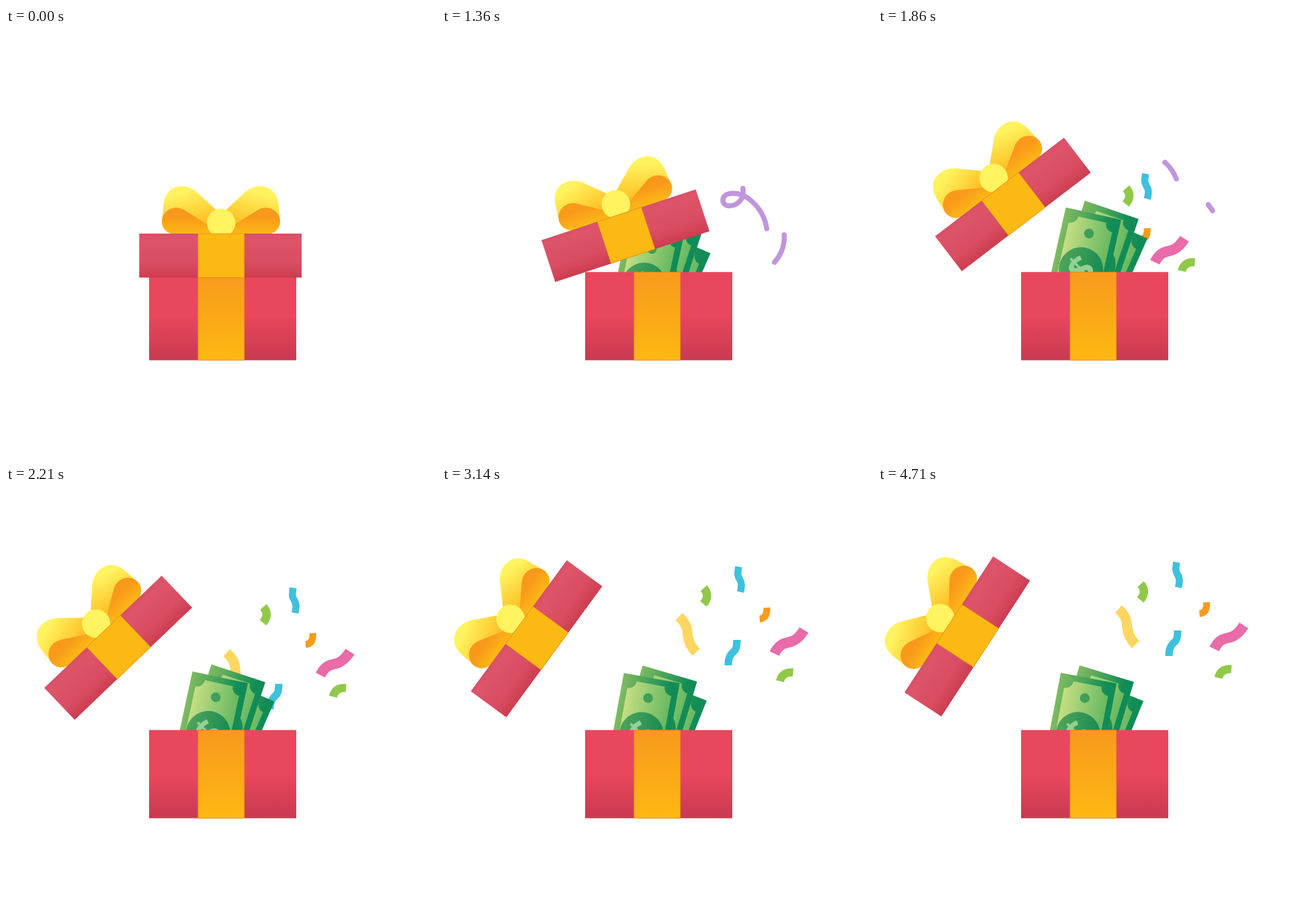
An HTML page that plays this animation: 640x640 px, repeating every 5370 ms.

```html
<!DOCTYPE html>
<html lang="en">
<head>
<meta charset="utf-8">
<title>Gift box</title>
<style>
html, body { margin: 0; width: 100%; height: 100%; overflow: hidden; background: #fff; }
svg { display: block; width: 100vw; height: 100vh; }
#confetti path, #streamers path { fill: none; }
#streamers path { stroke: #c095dd; stroke-width: 7.5; stroke-linecap: round; }
text { font: 700 56px "Open Sans", sans-serif; text-anchor: middle; }
.strip { stroke: #d98a1c; stroke-width: .6; }
</style>
</head>
<body>
<svg viewBox="0 0 640 640">
  <defs>
    <linearGradient id="body" x2="0" y2="1">
      <stop offset=".5" stop-color="#e8475d"/><stop offset="1" stop-color="#c93a50"/>
    </linearGradient>
    <linearGradient id="lidRed" x2="0" y2="1">
      <stop stop-color="#d84f66"/><stop offset=".1" stop-color="#dd5469"/>
      <stop offset=".65" stop-color="#da4d62"/><stop offset="1" stop-color="#cd3d50"/>
    </linearGradient>
    <linearGradient id="ribbon" x2="0" y2="1">
      <stop stop-color="#f8991c"/><stop offset="1" stop-color="#fdb813"/>
    </linearGradient>
    <linearGradient id="loop" x1=".3" x2=".65" y2="1">
      <stop offset=".15" stop-color="#fff35f"/><stop offset="1" stop-color="#fcb81c"/>
    </linearGradient>
    <linearGradient id="fold" x2="0" y2="1">
      <stop offset=".35" stop-color="#f9991b"/><stop offset="1" stop-color="#fdb915"/>
    </linearGradient>
    <linearGradient id="edge"><stop stop-color="#7fbb60"/><stop offset=".85" stop-color="#118c56"/></linearGradient>
    <linearGradient id="panel"><stop stop-color="#c6de82"/><stop offset="1" stop-color="#67b962"/></linearGradient>
    <linearGradient id="seal"><stop stop-color="#4fa45a"/><stop offset="1" stop-color="#168a54"/></linearGradient>
    <g id="bill">
      <path d="M0 0H84.5V105H0Z" fill="url(#edge)"/>
      <path d="M21 9H63.5A12 12 0 0 0 75.5 21V105H9V21A12 12 0 0 0 21 9Z" fill="url(#panel)"/>
      <circle cx="42.2" cy="30.3" r="7.2" fill="#3f9f58"/>
      <circle cx="42.2" cy="85" r="33" fill="url(#seal)"/>
      <text transform="translate(42.2 85) rotate(-57)" y="20" fill="#93d193">$</text>
    </g>
    <g id="bow">
      <path d="M316 274L287 247C270 229 238 231 234.5 262L232 290L302 300Z" fill="url(#loop)"/>
      <path d="M304 295L267 272C251 261 232 272 232 288C232 299 241 307 251 307H312Z" fill="url(#fold)"/>
    </g>
  </defs>
  <g id="streamers">
    <path pathLength="1" d="M467.5 343.5C481 329 486 315 483.5 300C481 281 473 268 460 257C444 242 419 243 418 256C418 268 437 268 446 254C453 239 442 213 427 200"/>
    <path pathLength="1" d="M492 352C503 340 508 330 509 318C511 299 504 278 491.500 263"/>
  </g>
  <g id="confetti"></g>
  <g id="bills">
    <use href="#bill" transform="translate(316.7 288.3) rotate(22)"/>
    <use href="#bill" transform="translate(300 267) rotate(16.8)"/>
    <use href="#bill" transform="translate(272 278) rotate(10.7)"/>
  </g>
  <path d="M213 363.200H432V494.500H213Z" fill="url(#body)"/>
  <path class="strip" d="M285.800 363.200H354.800V494.500H285.800Z" fill="url(#ribbon)"/>
  <g id="lid">
    <g transform="translate(-319 -371.5)">
      <use href="#bow"/>
      <use href="#bow" transform="matrix(-1 0 0 1 640 0)"/>
      <circle cx="320.2" cy="290" r="21.2" fill="#fff35f"/>
      <path d="M198.300 306H440V371.500H198.300Z" fill="url(#lidRed)"/>
      <path class="strip" d="M285.800 306H354.800V371.500H285.800Z" fill="#fcb813"/>
    </g>
  </g>
</svg>
<script>
const LOOP = 5370, HOLD = 500, FPS = 14;
const $ = id => document.getElementById(id);

// Monotone cubic through the points (times[i], values[i]); flat at both ends.
function curve(times, values) {
  const slope = i => (values[i + 1] - values[i]) / (times[i + 1] - times[i]);
  const tangent = i => {
    if (i === 0 || i === times.length - 1) return 0;
    const a = slope(i - 1), b = slope(i);
    return a * b > 0 ? 2 * a * b / (a + b) : 0;
  };
  return t => {
    if (t <= times[0]) return values[0];
    const i = times.findIndex(end => t <= end) - 1;
    if (i < 0) return values.at(-1);
    const h = times[i + 1] - times[i], u = (t - times[i]) / h, v = 1 - u;
    return v * v * (1 + 2 * u) * values[i] + u * u * (1 + 2 * v) * values[i + 1]
      + h * u * v * (v * tangent(i) - u * tangent(i + 1));
  };
}

const STEPS = [7, 15, 24, 31, 43, 59];
const lidX = curve(STEPS, [319, 253.5, 189.5, 175, 162.5, 160.2]);
const lidY = curve(STEPS, [371.5, 315, 264.5, 253, 243.5, 242]);
const lidTurn = curve(STEPS, [0, -30.3, -43.7, -49.9, -56, -56.9]);
const squash = curve([-1, 7, 10], [1, .91, 1]);
const billTurn = curve(STEPS, [0, 2.1, 1.4, -.7, 0, 0]);
const billY = curve(STEPS, [75, -15, -1, 0, 0, 0]);
const spread = curve(STEPS, [7, 4.45, 1, .4, .06, 0]);

const trims = [
  { head: curve([5, 7, 15], [0, .2, 1]), tail: curve([7, 15, 21], [0, .41, 1]) },
  { head: curve([9, 15], [0, 1]), tail: curve([11, 15, 21], [0, .39, 1]) },
];

// Resting curve, its height, and the offset that shrinks as the piece flies out.
const pieces = [
  ["#ffd662", 15, 210, -29.5, 65, "M358 183C372 196 370 205 371 211S373 225 383.5 236"],
  ["#3ec1de", 10.5, 132, -17, 38, "M444.5 113.5C442.5 125 443 127 446 132S449.5 141 447 151"],
  ["#8fc947", 12.5, 157, -8, 34, "M391 146Q401 157 390.5 169.5"],
  ["#f99b1c", 10, 184, -32.5, 46, "M489.2 173Q490 189 478.5 190"],
  ["#e96ba8", 15.5, 225, -32.5, 39, "M500.5 242.5C508 227 517 227 523 225.5S536 221 544.5 207.5"],
  ["#8fc947", 12, 276, -20, 28, "M506.5 285.5Q510 271.500 526 272.5"],
  ["#3ec1de", 11, 234, -40, 79.5, "M446 215C446 231 442 231 439.5 234S433 240 433 253"],
].map(([color, width, y, dx, dy, d]) => {
  const node = document.createElementNS("http://www.w3.org/2000/svg", "path");
  node.setAttribute("d", d);
  node.setAttribute("stroke", color);
  node.setAttribute("stroke-width", width);
  $("confetti").append(node);
  return { node, dx, dy, limit: (410 - y) / dy };
});

const place = (node, transform) => node.setAttribute("transform", transform);

function draw(now) {
  const time = now % LOOP;
  const step = Math.min(59, Math.max(-1, Math.floor((time - HOLD + 5) * FPS / 1000)));

  place($("lid"), `translate(${lidX(step)} ${lidY(step)}) rotate(${lidTurn(step)}) scale(1 ${squash(step)})`);
  place($("bills"), `translate(0 ${billY(step)}) rotate(${billTurn(step)} 320 500)`);

  for (const { node, dx, dy, limit } of pieces) {
    const k = Math.min(spread(step), limit);
    place(node, `translate(${dx * k} ${dy * k})`);
  }

  trims.forEach(({ head, tail }, i) => {
    const from = tail(step), length = head(step) - from;
    const style = $("streamers").children[i].style;
    style.display = length > .001 ? "" : "none";
    style.strokeDasharray = `${Math.max(length, 0)} 3`;
    style.strokeDashoffset = -from;
  });
  requestAnimationFrame(draw);
}
requestAnimationFrame(draw);
</script>
</body>
</html>
```
